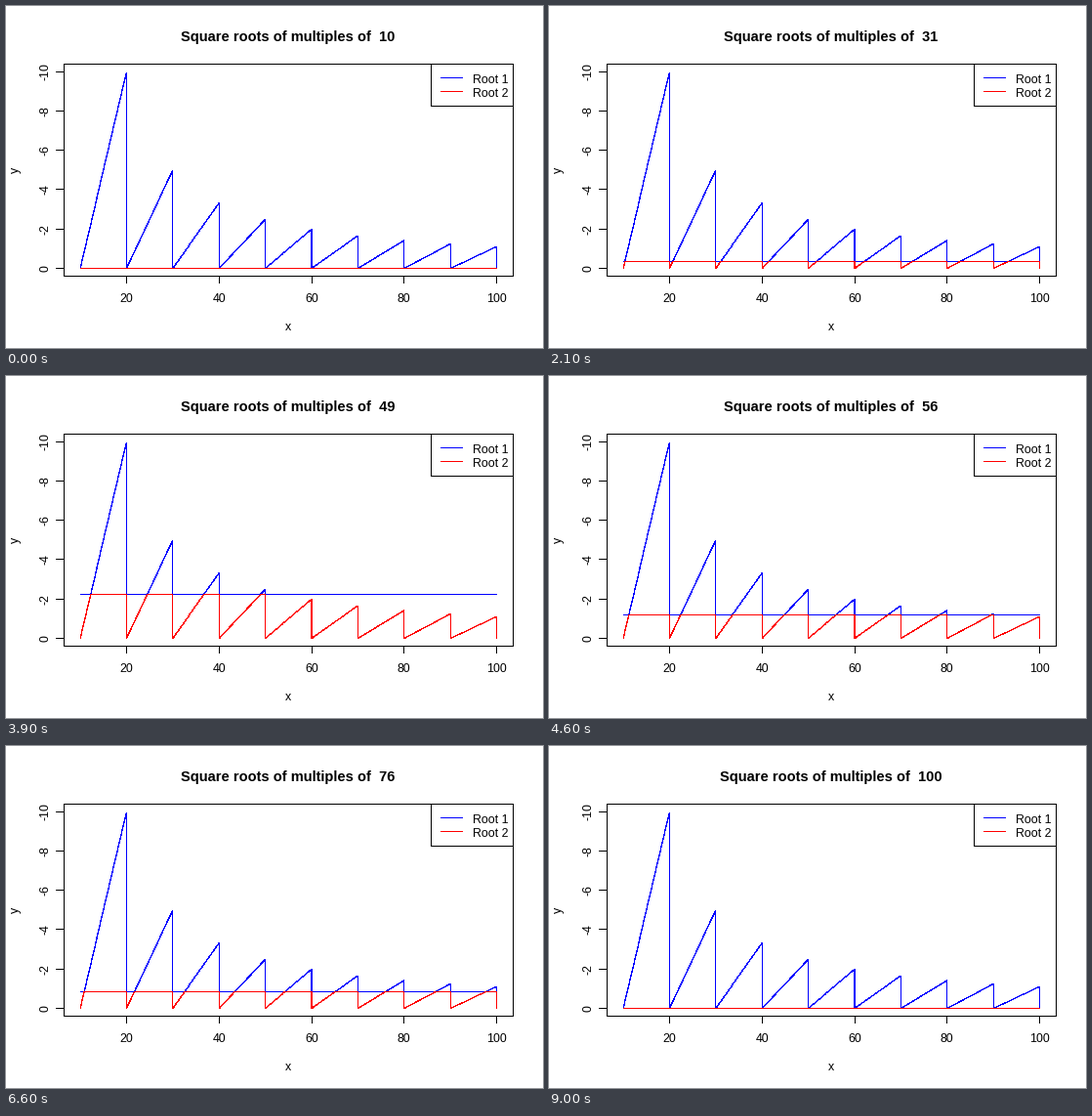
Write a matplotlib script that moves like this. It is 550 by 350 pixels and loops after 9100 ms.

```python
import numpy as np
import matplotlib.pyplot as plt
from matplotlib.animation import FuncAnimation

W, H, DPI = 550, 350, 100
PX = 72 / DPI
LEFT, RIGHT, TOP, BOTTOM = 59.04, 519.76, 59.04, 276.56
STEPS = 20  # samples per unit of x

plt.rcParams["font.family"] = "Liberation Sans"
plt.rcParams["path.simplify"] = False

fig = plt.figure(figsize=(W / DPI, H / DPI), dpi=DPI, facecolor="white")
ax = fig.add_axes([0, 0, 1, 1])
ax.set_xlim(0, W)
ax.set_ylim(H, 0)
ax.axis("off")


def snap(v):
    return np.floor(v) + 0.5


def to_x(x):
    """Data x (10..100) to pixels, with a 4% margin on both sides."""
    return snap(LEFT + (RIGHT - LEFT) * (0.04 + (x - 10) / 90) / 1.08)


def to_y(y):
    """Data y (0..-10, upwards) to pixels."""
    return snap(BOTTOM - (BOTTOM - TOP) * (0.04 - y / 10) / 1.08)


def stroke(xs, ys, color="black", z=2):
    line, = ax.plot(xs, ys, color=color, lw=PX, antialiased=False, snap=False,
                    solid_capstyle="projecting", solid_joinstyle="miter", zorder=z)
    return line


def label(x, y, s, size=12.4, ha="center", **kw):
    return ax.text(x, y, s, fontsize=size * PX, ha=ha, va="baseline",
                   rotation_mode="anchor", **kw)


def box(x0, y0, x1, y1):
    stroke(snap(np.array([x0, x1, x1, x0, x0])), snap(np.array([y0, y0, y1, y1, y0])))


def saw(k, unit):
    """Remainder over quotient of k / (10 * unit), as a negative height."""
    return -(k % (10 * unit)) / unit / (k // (10 * unit))


# Frame and axes
box(LEFT, TOP, RIGHT, BOTTOM)
for v in range(20, 101, 20):
    x = to_x(v)
    stroke([x, x], [snap(BOTTOM), snap(BOTTOM + 7.2)])
    label(x, 303, str(v))
for v in range(0, -11, -2):
    y = to_y(v)
    stroke([snap(LEFT - 7.2), snap(LEFT)], [y, y])
    label(43, y, str(v), rotation=90)
label(288.5, 332, "x")
label(13, 167.8, "y", rotation=90)

# Legend
box(435, TOP, RIGHT, 102)
for i, color in enumerate(("blue", "red")):
    y = snap(TOP + 14.4 * (i + 1))
    stroke([445.5, 467.5], [y, y], color)
    label(478, 79 + 14 * i, f"Root {i + 1}", ha="left")

# Curves
k = np.arange(10 * STEPS, 100 * STEPS + 1)
curve = saw(k, STEPS)
xs = to_x(k / STEPS)
root1 = stroke(xs, to_y(curve), "blue", 3)
root2 = stroke(xs, to_y(curve), "red", 4)
title = label(289, 36, "", 14.6, weight="bold")


def update(i):
    n = 10 + i
    level = saw(n, 1)
    root1.set_ydata(to_y(np.minimum(curve, level)))
    root2.set_ydata(to_y(np.maximum(curve, level)))
    title.set_text(f"Square roots of multiples of  {n}")
    return root1, root2, title


anim = FuncAnimation(fig, update, frames=91, interval=100, repeat=True, repeat_delay=0)
plt.show()
```
